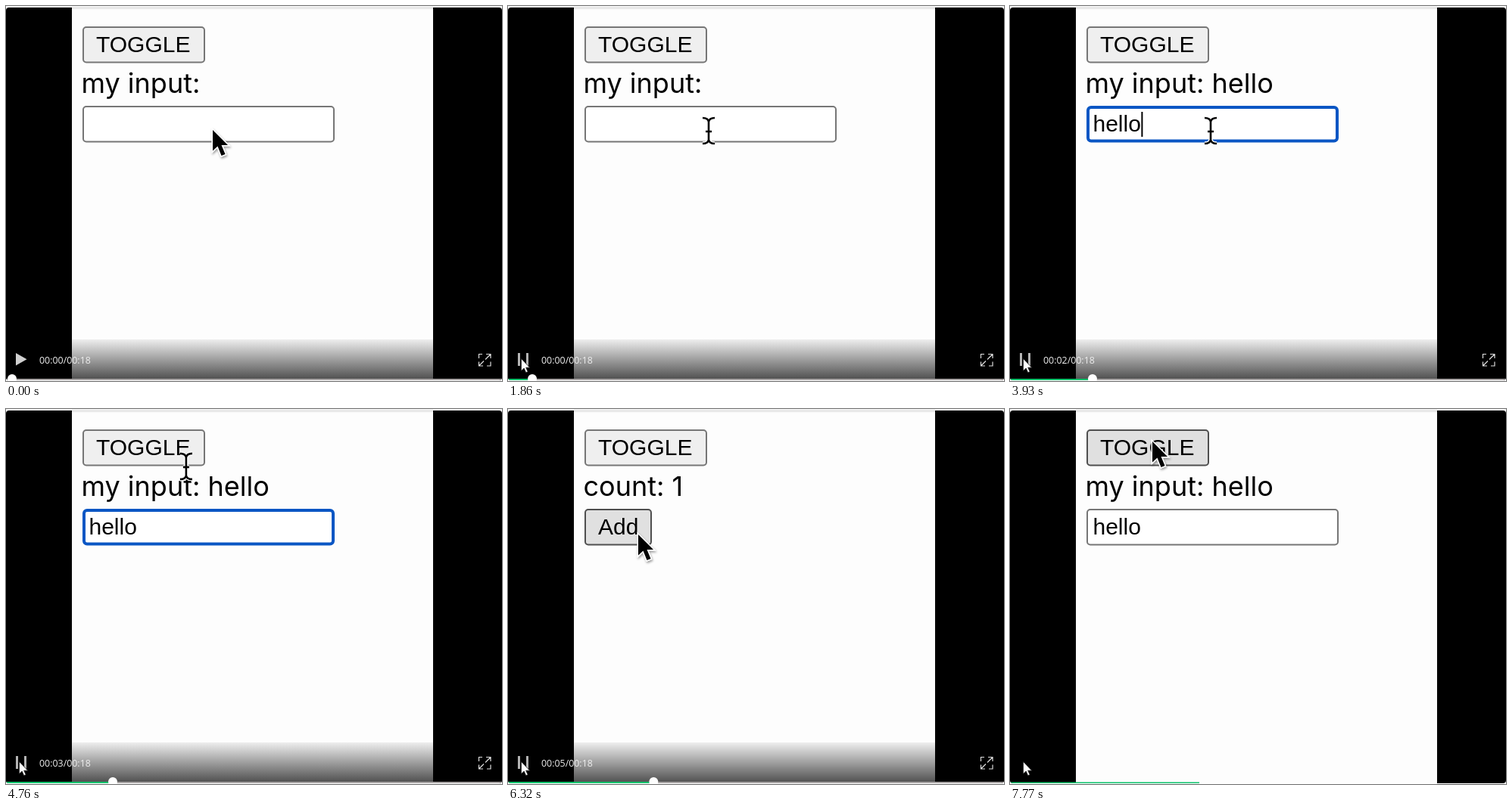
Write an HTML page that moves like this. It is 655 by 496 pixels and loops after 8 s.

```html
<!DOCTYPE html>
<html lang="en">
<head>
<meta charset="utf-8">
<title>Toggle demo</title>
<style>
html, body { margin: 0; width: 100%; height: 100%; overflow: hidden; background: #fff; }
svg { display: block; width: 655px; height: 496px; }
.ui { font: 30px "Liberation Sans", Arial, sans-serif; }
.label { font: 36px Inter, sans-serif; }
.time { font: 12.4px "Open Sans", "Noto Sans", sans-serif; fill: #eee; }
.btn { fill: #efefef; stroke: #767676; stroke-width: 2; }
.btn.hover { fill: #e0e0e0; stroke: #4f4f4f; }
#field { fill: #fff; stroke: #767676; stroke-width: 2; }
#field.focus { stroke: #0a56c4; stroke-width: 4; }
</style>
</head>
<body>
<svg viewBox="0 0 655 496">
  <defs>
    <linearGradient id="shade" x2="0" y2="1">
      <stop offset="0" stop-opacity=".06"/>
      <stop offset="1" stop-opacity=".7"/>
    </linearGradient>
    <linearGradient id="edge" x2="0" y2="1">
      <stop offset="0" stop-color="#dcdcdc"/>
      <stop offset="1" stop-color="#fdfdfd"/>
    </linearGradient>
    <filter id="shadow" x="-50%" y="-50%" width="200%" height="200%">
      <feDropShadow dx="1" dy="2" stdDeviation="1.5" flood-opacity=".4"/>
    </filter>
    <clipPath id="frame"><rect y="2" width="655" height="493" rx="4"/></clipPath>
  </defs>
  <rect width="655" height="2" fill="#f0f0f0"/>
  <g clip-path="url(#frame)">
    <rect width="655" height="496"/>
    <rect x="87" width="477" height="496" fill="#fdfdfd"/>
    <rect x="87" y="2" width="477" height="3" fill="url(#edge)"/>

    <rect id="toggle" class="btn" x="102" y="28" width="160" height="46.5" rx="4"/>
    <text class="ui" x="119" y="61">TOGGLE</text>
    <text id="label" class="label" x="99.5" y="115"></text>
    <g id="inputView">
      <rect id="field"/>
      <text id="typed" class="ui" x="109.5" y="166"></text>
      <rect id="caret" y="140" width="2" height="33"/>
    </g>
    <g id="countView">
      <rect id="add" class="btn" x="102" y="133" width="87" height="46.5" rx="4"/>
      <text class="ui" x="119" y="166">Add</text>
    </g>

    <path id="arrow" filter="url(#shadow)" stroke="#fff" stroke-width="3" paint-order="stroke"
      d="M0 1V28.5L6.5 22.5L11.5 35L16.5 33L11.5 21H20Z"/>
    <g id="ibeam" fill="none">
      <path id="beam" stroke="#fff" stroke-width="5" d="M-8-17Q-1-17 0-12Q1-17 8-17M-8 17Q-1 17 0 12Q1 17 8 17M0-12V12M-4 1H4"/>
      <use href="#beam"/>
      <path stroke="#000" stroke-width="2.6" d="M-8-17Q-1-17 0-12Q1-17 8-17M-8 17Q-1 17 0 12Q1 17 8 17M0-12V12M-4 1H4"/>
    </g>

    <g id="controls">
      <rect y="441" width="655" height="54" fill="url(#shade)"/>
      <path id="play" d="M13 459L27.5 467.3L13 475.5Z" fill="#d0d0d0"/>
      <path id="pause" d="M13 459h3v17h-3zM24 459h3v17h-3z" fill="#b4b4b4"/>
      <text id="clock" class="time" x="44" y="473"></text>
      <path d="M624.5 466V460.5H629M640 470.5V476H635M634 460.5H640V466M640 460.5L633 467.5M630 476H624.5V470.5M624.5 476L631 469.5"
        fill="none" stroke="#ddd" stroke-width="1.2"/>
      <rect y="493" width="655" height="2" fill="#a9a5a5"/>
    </g>
    <rect id="bar" height="2" fill="#0bc26b"/>
  </g>
  <circle id="knob" cy="493" r="6" fill="#fff"/>
  <path id="mouse" fill="#fff" stroke="#222" stroke-width=".8" d="M0 0V16L3.7 12.6L6.2 18.3L8.7 17.2L6.2 11.7H11.2Z"/>
</svg>
<script>
const LOOP = 8000;
const $ = id => document.getElementById(id);
const set = (id, attrs) => { for (const k in attrs) $(id).setAttribute(k, attrs[k]); };
const show = (id, on) => set(id, { opacity: +on });
const clamp = v => Math.max(0, Math.min(1, v));

// Pointer inside the video: [time, x, y]
const videoPath = [
  [0, 273, 163], [1810, 273, 163], [1820, 265, 165], [4290, 265, 165],
  [4760, 238, 76], [5050, 205, 42], [5500, 205, 42], [5670, 222, 148],
  [6040, 172, 165], [6900, 172, 165], [7250, 188, 42], [LOOP, 188, 42]
];
// Pointer over the player
const mousePath = [
  [130, 124, 489], [220, 80, 484], [330, 42, 475], [500, 18, 467.5],
  [640, 18, 467.5], [650, 17.5, 466.5], [LOOP, 17.5, 466.5]
];
const keyTimes = [3220, 3470, 3580, 3750, 3930];

function at(path, t) {
  const i = Math.max(1, path.findIndex(p => p[0] > t));
  const [a, b] = [path[i - 1], path[i]];
  const u = clamp((t - a[0]) / (b[0] - a[0]));
  return [a[1] + (b[1] - a[1]) * u, a[2] + (b[2] - a[2]) * u];
}

function drawPage(t) {
  const [x, y] = at(videoPath, t);
  const counting = t >= 5180 && t < 7630;
  const focused = t >= 2400 && t < 5180;
  const word = "hello".slice(0, keyTimes.filter(k => k <= t).length);
  const overToggle = x > 101 && x < 263 && y > 27 && y < 75;
  const overAdd = counting && x > 101 && x < 190 && y > 132 && y < 180;
  const beam = t >= 1820 && t < 5000 && !overToggle;

  $("toggle").classList.toggle("hover", overToggle);
  $("add").classList.toggle("hover", overAdd);
  $("label").textContent = counting ? "count: " + (t < 6320 ? 0 : 1) : "my input: " + word;
  show("inputView", !counting);
  show("countView", counting);

  $("field").classList.toggle("focus", focused);
  const inset = focused ? 1 : 0;
  set("field", { x: 102 + inset, y: 133 + inset, width: 331 - 2 * inset, height: 46.5 - 2 * inset, rx: 4 });
  $("typed").textContent = word;
  const lastKey = keyTimes.filter(k => k <= t).pop() || 2400;
  show("caret", focused && (t - lastKey) % 1000 < 500);
  set("caret", { x: 110 + (word ? $("typed").getComputedTextLength() : 0) });

  show("arrow", !beam);
  show("ibeam", beam);
  const transform = `translate(${x} ${y})`;
  set("arrow", { transform });
  set("ibeam", { transform });
}

function drawPlayer(t) {
  // Playback position is reported in coarse ticks
  const tick = Math.floor((t - 1380) / 265);
  const playing = tick >= 0;
  const x = playing ? 6.41 * Math.floor(4.5 + 1.462 * tick) : 8;
  const seconds = playing ? Math.floor((300 + 265 * tick) / 1000) : 0;
  const visible = 1 - clamp((t - 6320) / 130);

  $("clock").textContent = `00:0${seconds}/00:18`;
  show("controls", visible);
  show("knob", visible);
  set("knob", { cx: x });
  set("bar", { width: playing ? x : 0, y: visible ? 493 : 493.5 });
  const swap = clamp((t - 840) / 130);
  show("play", 1 - swap);
  show("pause", swap);

  const [mx, my] = at(mousePath, t);
  show("mouse", t >= 130);
  set("mouse", { transform: `translate(${mx} ${my})` });
}

const start = performance.now();
function frame() {
  const t = (performance.now() - start) % LOOP;
  drawPage(t);
  drawPlayer(t);
  requestAnimationFrame(frame);
}
frame();
</script>
</body>
</html>
```
